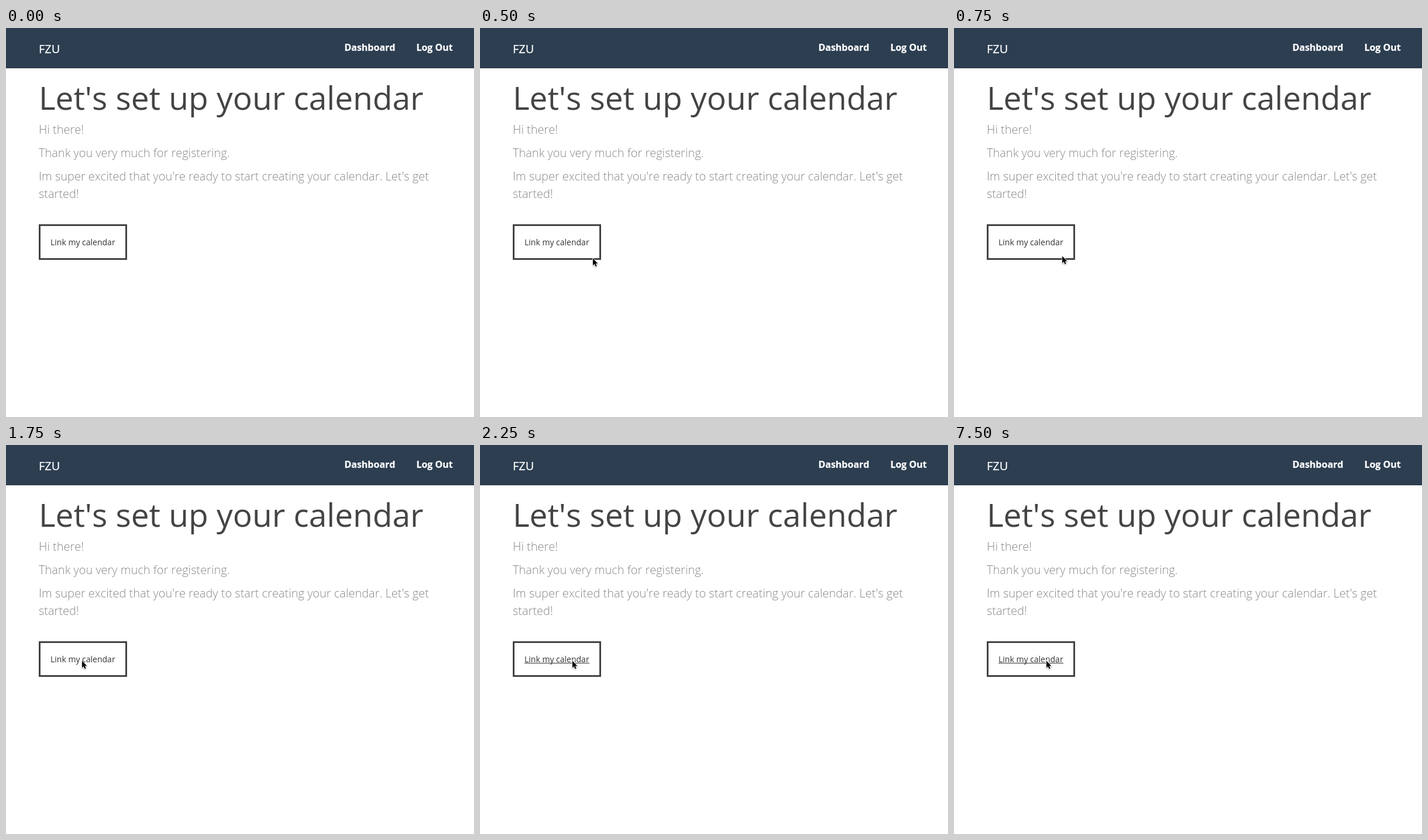
These frames come from a looping animation (800x666 px, 8000 ms). An HTML page:

```html
<!DOCTYPE html>
<html lang="en">
<head>
<meta charset="utf-8">
<title>Calendar setup</title>
<style>
html, body { margin: 0; height: 100%; overflow: hidden; background: #fff; }
svg { display: block; width: 800px; height: 666px; font-family: "Open Sans", sans-serif; font-kerning: none; }
.bar { fill: #fff; stroke: #fff; stroke-width: .25px; }
.nav { font-size: 16px; font-weight: 700; }
.copy { font-size: 20px; font-weight: 300; fill: #888; }
#cursor { filter: drop-shadow(0 1px 1px rgba(0, 0, 0, .35)); }
</style>
</head>
<body>
<svg viewBox="0 0 800 666">
  <rect width="800" height="69" fill="#2c3e50"/>
  <g class="bar">
    <text x="56" y="43" font-size="20">FZU</text>
    <g class="nav">
      <text x="578.4" y="39">Dashboard</text>
      <text x="701.4" y="39">Log Out</text>
    </g>
  </g>
  <text x="56" y="140" font-size="55" fill="#444">Let's set up your calendar</text>
  <g class="copy">
    <text x="56" y="181">Hi there!</text>
    <text x="56" y="221">Thank you very much for registering.</text>
    <text x="56" y="261">Im super excited that you're ready to start creating your calendar. Let's get</text>
    <text x="56" y="291">started!</text>
  </g>
  <rect x="57.5" y="337.5" width="148" height="58" fill="none" stroke="#444" stroke-width="3"/>
  <text x="76" y="372" font-size="14" fill="#333">Link my calendar</text>
  <rect id="underline" x="76" y="373" width="111" height="1" fill="#333"/>
  <g id="cursor">
    <path d="M1 1.5V13.6L3.7 11 5.6 15.3 7.6 14.4 5.8 10.2H9.4Z" stroke="#fff" stroke-width="1.4" paint-order="stroke"/>
  </g>
</svg>
<script>
const cursor = document.getElementById("cursor");
const underline = document.getElementById("underline");
// Start time, cursor x, cursor y
const stops = [[500, 192, 393], [750, 184, 389], [1000, 129, 368], [2250, 157, 368]];

function draw(now) {
  const t = now % 8000;
  const stop = stops.filter(s => s[0] <= t).pop();
  cursor.style.display = stop ? "" : "none";
  if (stop) cursor.setAttribute("transform", `translate(${stop[1]} ${stop[2]})`);
  underline.style.display = t >= 2250 ? "" : "none";
}

const start = performance.now();
function tick() {
  draw(performance.now() - start);
  requestAnimationFrame(tick);
}
tick();
</script>
</body>
</html>
```
